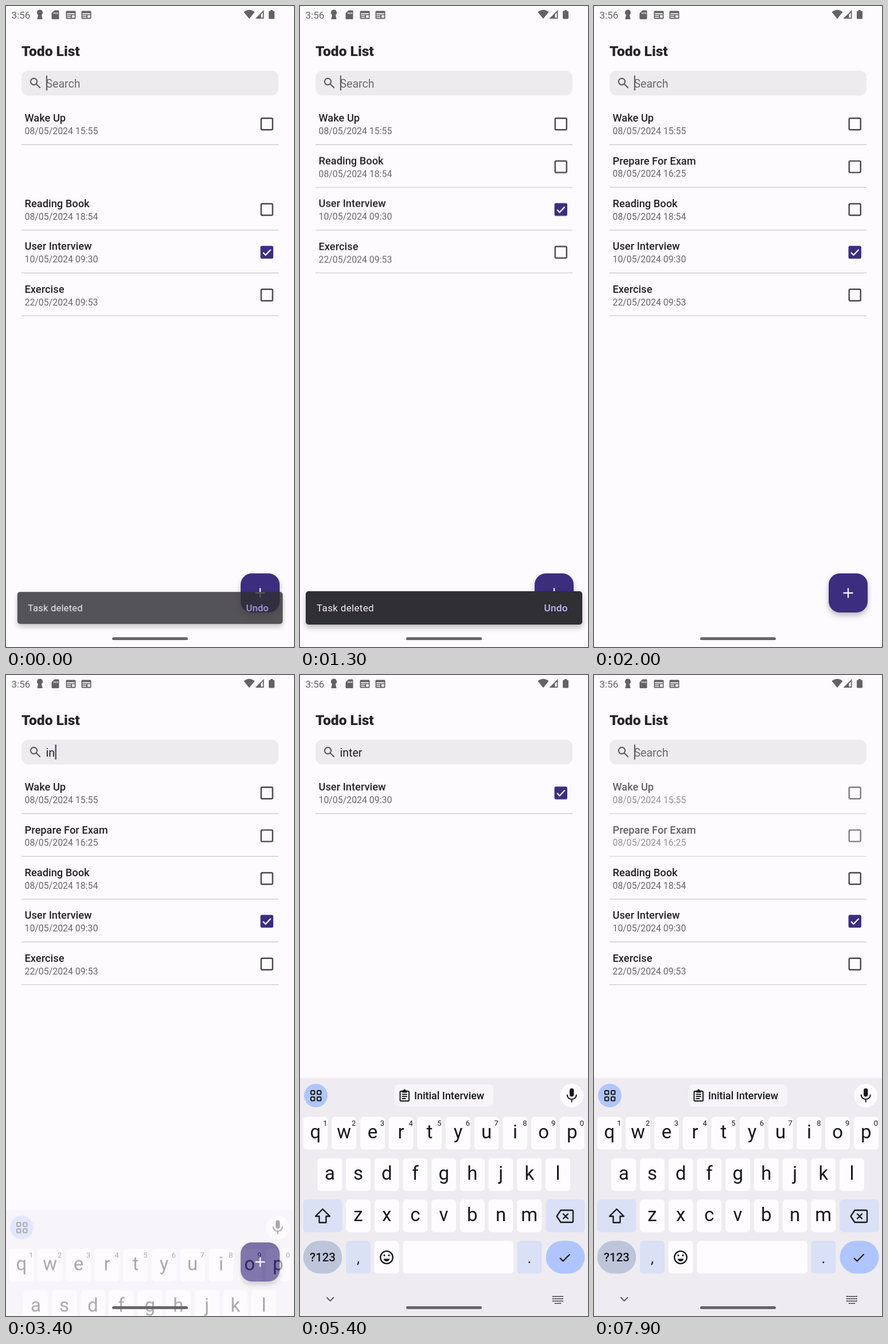
An HTML page for the animation above (8 s loop, 502 by 1115 pixels).

```html
<!DOCTYPE html>
<html lang="en">
<head>
<meta charset="utf-8">
<title>Todo List</title>
<style>
html, body { margin: 0; width: 502px; height: 1115px; overflow: hidden; background: #fefbff; }
svg { display: block; font-family: Roboto, sans-serif; }
.line { fill: none; stroke: currentColor; stroke-linecap: round; stroke-linejoin: round; }
.mid { text-anchor: middle; }

/* List rows: a move track (eased) and a fade track (linear) */
.row { animation: 8s infinite; animation-timing-function: cubic-bezier(.37,0,.63,1), linear; }
.wake { animation-name: none, wakeFade; }
.prepare { transform: translateY(74.4px); animation-name: none, prepareFade; }
.reading { animation-name: readingMove, readingFade; }
.interview { animation-name: interviewMove; }
.exercise { animation-name: exerciseMove, exerciseFade; }

@keyframes wakeFade {
  0%, 42.875% { opacity: 1 }
  44.375%, 97.7% { opacity: 0 }
  99.2%, 100% { opacity: 1 }
}
@keyframes prepareFade {
  0%, 20.19% { opacity: 0 }
  21.69%, 42.875% { opacity: 1 }
  44.375%, 97.7% { opacity: 0 }
  99.2%, 100% { opacity: 1 }
}
@keyframes readingFade {
  0%, 46.5% { opacity: 1 }
  48%, 93.6% { opacity: 0 }
  93.62%, 100% { opacity: 1 }
}
@keyframes exerciseFade {
  0%, 42.875% { opacity: 1 }
  44.375%, 93.6% { opacity: 0 }
  93.62%, 100% { opacity: 1 }
}
@keyframes readingMove {
  0%, .375% { transform: translateY(148.8px) }
  3.5%, 17.06% { transform: translateY(74.4px) }
  20.19%, 44.375% { transform: translateY(148.8px) }
  47.5%, 94.575% { transform: translateY(0) }
  97.7%, 100% { transform: translateY(148.8px) }
}
@keyframes interviewMove {
  0%, .375% { transform: translateY(223.2px) }
  3.5%, 17.06% { transform: translateY(148.8px) }
  20.19%, 44.375% { transform: translateY(223.2px) }
  46.875% { transform: translateY(74.4px) }
  49.875%, 92.75% { transform: translateY(0) }
  94.575% { transform: translateY(74.4px) }
  97.7%, 100% { transform: translateY(223.2px) }
}
@keyframes exerciseMove {
  0%, .375% { transform: translateY(297.6px) }
  3.5%, 17.06% { transform: translateY(223.2px) }
  20.19%, 44.375% { transform: translateY(297.6px) }
  60%, 94.575% { transform: translateY(148.8px) }
  97.7%, 100% { transform: translateY(297.6px) }
}

/* Typing: the cover hides the letters after the caret */
.cover, .caret { animation: type 8s step-end infinite; }
.blink { animation: blink 8s step-end infinite; }
.hint { animation: hint 8s step-end infinite; }
@keyframes type {
  0% { transform: translateX(0) }
  41.15% { transform: translateX(4.7px) }
  42.25% { transform: translateX(15.5px) }
  44.5% { transform: translateX(21.9px) }
  46.5% { transform: translateX(32.2px) }
  48.65% { transform: translateX(38.8px) }
  86.15% { transform: translateX(32.2px) }
  91.15% { transform: translateX(21.9px) }
  92% { transform: translateX(15.5px) }
  92.75% { transform: translateX(4.7px) }
  93.5%, 100% { transform: translateX(0) }
}
@keyframes blink {
  0%, 12.4%, 24.9%, 37.4%, 61.15%, 73.65%, 86.15%, 100% { opacity: 1 }
  6.15%, 18.65%, 31.15%, 54.9%, 67.4%, 79.9% { opacity: 0 }
}
@keyframes hint {
  0%, 93.5%, 100% { opacity: 1 }
  41.15% { opacity: 0 }
}

.fab { filter: drop-shadow(0 5px 5px #0004); }
.snack {
  transform-origin: 251px 1047px;
  filter: drop-shadow(0 5px 5px #0004);
  animation: snackScale 8s ease-out infinite, snackFade 8s linear infinite;
}
@keyframes snackScale { 0% { transform: scale(.9585) } .8%, 100% { transform: none } }
@keyframes snackFade {
  0% { opacity: .82 }
  .5%, 17.06% { opacity: 1 }
  18%, 100% { opacity: 0 }
}

.board { color: #17171b; animation: rise 8s cubic-bezier(.2,0,0,1) infinite, boardFade 8s linear infinite; }
.chip { animation: chipFade 8s linear infinite; }
@keyframes rise {
  0%, 41.875% { transform: translateY(412px) }
  45.44%, 100% { transform: translateY(0) }
}
@keyframes boardFade { 0%, 41.875% { opacity: 0 } 43.66%, 100% { opacity: 1 } }
@keyframes chipFade { 0%, 45.5% { opacity: 0 } 46.75%, 100% { opacity: 1 } }
</style>
</head>
<body>
<svg width="502" height="1115" viewBox="0 0 502 1115">
  <defs>
    <linearGradient id="edge" x2="0" y2="1">
      <stop stop-color="#eeecf1" stop-opacity="0"/>
      <stop offset="1" stop-color="#e9e7ec"/>
    </linearGradient>
    <g id="news">
      <path d="M106 8.5h14q1.5 0 1.5 1.5v11q0 1.500-1.500 1.500h-14q-1.500 0-1.500-1.500v-11q0-1.500 1.500-1.500z" fill="#636266"/>
      <path d="M106.200 12.500h13.600v2h-13.600zM106.200 16h7v1.500h-7zM106.200 19h7v1.600h-7zM115 16h4.800v4.600h-4.800z" fill="#f3f1f4"/>
    </g>
  </defs>

  <!-- Status bar -->
  <g fill="#636266">
    <text x="9.500" y="21.500" font-size="17.100">3:56</text>
    <path d="M59 6.500a5 5 0 0 1 2.900 9.100l1.800 7.400h-9.400l1.800-7.400a5 5 0 0 1 2.900-9.100z"/>
    <path d="M84.500 7.500h6.500q1.500 0 1.500 1.500v12.500q0 1.500-1.500 1.500h-10q-1.500 0-1.500-1.500v-9z"/>
    <path d="M84 11v3M87 11v3M90 11v3" stroke="#fefbff" stroke-width="1.300"/>
    <use href="#news"/><use href="#news" x="27"/>
    <path d="M414.500 10.500q9.500-7.500 19 0l-9.500 11.700z"/>
    <path d="M449.500 7v15h-15z"/>
    <path d="M447.700 11.500v8.800h-3.200v-5.600z" fill="#fefbff"/>
    <path d="M461 7h4v1.700h1.700q1.300 0 1.300 1.300v11q0 1.500-1.500 1.500h-7q-1.500 0-1.500-1.500v-11q0-1.300 1.300-1.300h1.700z"/>
  </g>

  <text x="27" y="87.300" font-size="24.600" font-weight="800" fill="#262529">Todo List</text>

  <!-- Search field -->
  <rect x="27" y="112.500" width="448" height="43" rx="12" fill="#edebee"/>
  <g class="line" color="#5b5a5e" stroke-width="2.100">
    <circle cx="48.500" cy="131.500" r="5.600"/>
    <path d="M52.800 135.800l6.300 6.300"/>
  </g>
  <g font-size="19.530">
    <text x="69.500" y="141.500" fill="#1f1e22">inter</text>
    <rect class="cover" x="69.500" y="118" width="48" height="32" fill="#edebee"/>
    <text class="hint" x="69.500" y="141.500" fill="#6b6a6f">Search</text>
  </g>
  <g class="caret"><rect class="blink" x="69.900" y="121" width="2.100" height="26" fill="#5c5966"/></g>

  <g id="list"></g>

  <g class="fab">
    <rect x="409" y="987" width="68" height="68" rx="19.500" fill="#3d2d7e"/>
    <path d="M434.500 1021h17M443 1012.500v17" stroke="#f4f0fa" stroke-width="2.300"/>
  </g>

  <g class="snack" font-size="17.080" letter-spacing=".3">
    <rect x="10" y="1018" width="482" height="58" rx="5" fill="#302f33"/>
    <text x="29" y="1053" fill="#f3eff4">Task deleted</text>
    <text x="425.500" y="1053" fill="#c5b8f8" font-weight="500">Undo</text>
  </g>

  <!-- Keyboard -->
  <g class="board">
    <rect y="699" width="502" height="5" fill="url(#edge)"/>
    <rect y="703.500" width="502" height="412" fill="#eeecf1"/>
    <g id="keys"></g>

    <circle cx="27.500" cy="731.500" r="20.500" fill="#b0c5ff"/>
    <g class="line" stroke-width="2">
      <rect x="19" y="723" width="6.500" height="6.500" rx="1.500"/>
      <rect x="30" y="723" width="6.500" height="6.500" rx="1.500"/>
      <rect x="19" y="734" width="6.500" height="6.500" rx="1.500"/>
      <rect x="30" y="734" width="6.500" height="6.500" rx="1.500"/>
    </g>

    <circle cx="473.700" cy="731.500" r="20.500" fill="#fefcff"/>
    <rect x="470" y="719" width="7.400" height="14.500" rx="3.700" fill="currentColor"/>
    <path class="line" stroke-width="2" d="M465.700 730.500a8 7.500 0 0 0 16 0M473.700 738.500v4"/>

    <g class="chip">
      <rect x="165" y="712" width="172" height="39" rx="8" fill="#f7f5fa"/>
      <g class="line" stroke-width="2">
        <rect x="174.500" y="724" width="15.500" height="17" rx="1.500"/>
        <path d="M178.500 729.500h7.500M178.500 733.300h7.500M178.500 737h5"/>
      </g>
      <path d="M178 722.500h2.300a2 2 0 0 1 4 0h2.300v4h-8.600z" fill="currentColor"/>
      <text x="199" y="738" font-size="17.900" font-weight="500" fill="currentColor">Initial Interview</text>
    </g>

    <g class="line" stroke-width="2.300">
      <path d="M39.500 929l12.500 12.500h-6.500v11h-12v-11h-6.500z"/>
      <path d="M454.500 931h19.500q2 0 2 2v17q0 2-2 2h-19.500l-7-10.500zM459 937.500l8 8M467 937.500l-8 8"/>
      <path d="M453 1014l5.500 5.500 12-12" stroke-linecap="butt"/>
      <circle cx="151" cy="1013" r="10.800"/>
      <path d="M145.500 1015.500h11q-2 4.500-5.500 4.500t-5.500-4.500z" fill="currentColor" stroke="none"/>
      <path d="M147 1009.500v.1M155 1009.500v.1" stroke-width="3.200"/>
    </g>
    <path class="line" color="#5f5e63" stroke-width="2" d="M47 1083l5.700 5.700 5.700-5.700"/>
    <path class="line" color="#5f5e63" stroke-width="2" stroke-linecap="butt" stroke-dasharray="2 1.900"
      d="M440.500 1081h18M440.500 1085h18M440.500 1089h18M444.500 1093h10" />
  </g>

  <rect x="185" y="1098" width="132" height="5" rx="2.500" fill="#666569"/>
</svg>

<script>
const tasks = [
  ["wake", "Wake Up", "08/05/2024 15:55"],
  ["prepare", "Prepare For Exam", "08/05/2024 16:25"],
  ["reading", "Reading Book", "08/05/2024 18:54"],
  ["interview", "User Interview", "10/05/2024 09:30", true],
  ["exercise", "Exercise", "22/05/2024 09:53"],
];

const checkbox = done => done
  ? `<rect x="443.500" y="194" width="22.400" height="22.400" rx="2.800" fill="#3d2d7e"/>
     <path d="M448 205.500l4.500 4.500 9-9.500" fill="none" stroke="#fff" stroke-width="2.200"/>`
  : `<rect x="444.700" y="195.200" width="20" height="20" rx="1.800" fill="none" stroke="#49474d" stroke-width="2.400"/>`;

list.innerHTML = tasks.map(([name, title, date, done]) => `
  <g class="row ${name}">
    <text x="32.500" y="201.300" font-size="18.300" font-weight="500" fill="#232226">${title}</text>
    <text x="32.500" y="223" font-size="15.860" fill="#67666b">${date}</text>
    ${checkbox(done)}
    <rect x="27" y="240.500" width="448" height="1.300" fill="#c8c6cb"/>
  </g>`).join("");

const WHITE = "#fefcff", TINT = "#dae0f5", STEP = 49.7;
const rowTop = r => 768.5 + r * 71.9;
const key = (x, r, w = 43, fill = WHITE, rx = 6) =>
  `<rect x="${x}" y="${rowTop(r)}" width="${w}" height="57" rx="${rx}" fill="${fill}"/>`;
const label = (x, y, size, text, weight = 400) =>
  `<text class="mid" x="${x}" y="${y}" font-size="${size}" font-weight="${weight}" fill="currentColor">${text}</text>`;

const letters = [["qwertyuiop", 5.5], ["asdfghjkl", 30.4], ["zxcvbnm", 80]]
  .map(([chars, left], r) => [...chars].map((c, i) => {
    const x = left + i * STEP;
    const digit = r ? "" : label(x + 38.5, 783.5, 13, (i + 1) % 10);
    return key(x, r) + label(x + 21.5, rowTop(r) + 37.6, 33, c) + digit;
  }).join("")).join("");

keys.innerHTML = letters
  + key(5.5, 2, 68, TINT) + key(428.5, 2, 68, TINT)
  + key(5.5, 3, 68, "#bec5da", 28.5) + key(80, 3, 43, TINT)
  + key(129.700, 3) + key(179.400, 3, 192.500)
  + key(378.500, 3, 43, TINT) + key(428.500, 3, 68, "#b0c5ff", 28.5)
  + label(39.5, 1020.300, 20.500, "?123", 500)
  + label(101.500, 1023, 26, ",") + label(400, 1023, 26, ".");
</script>
</body>
</html>
```
